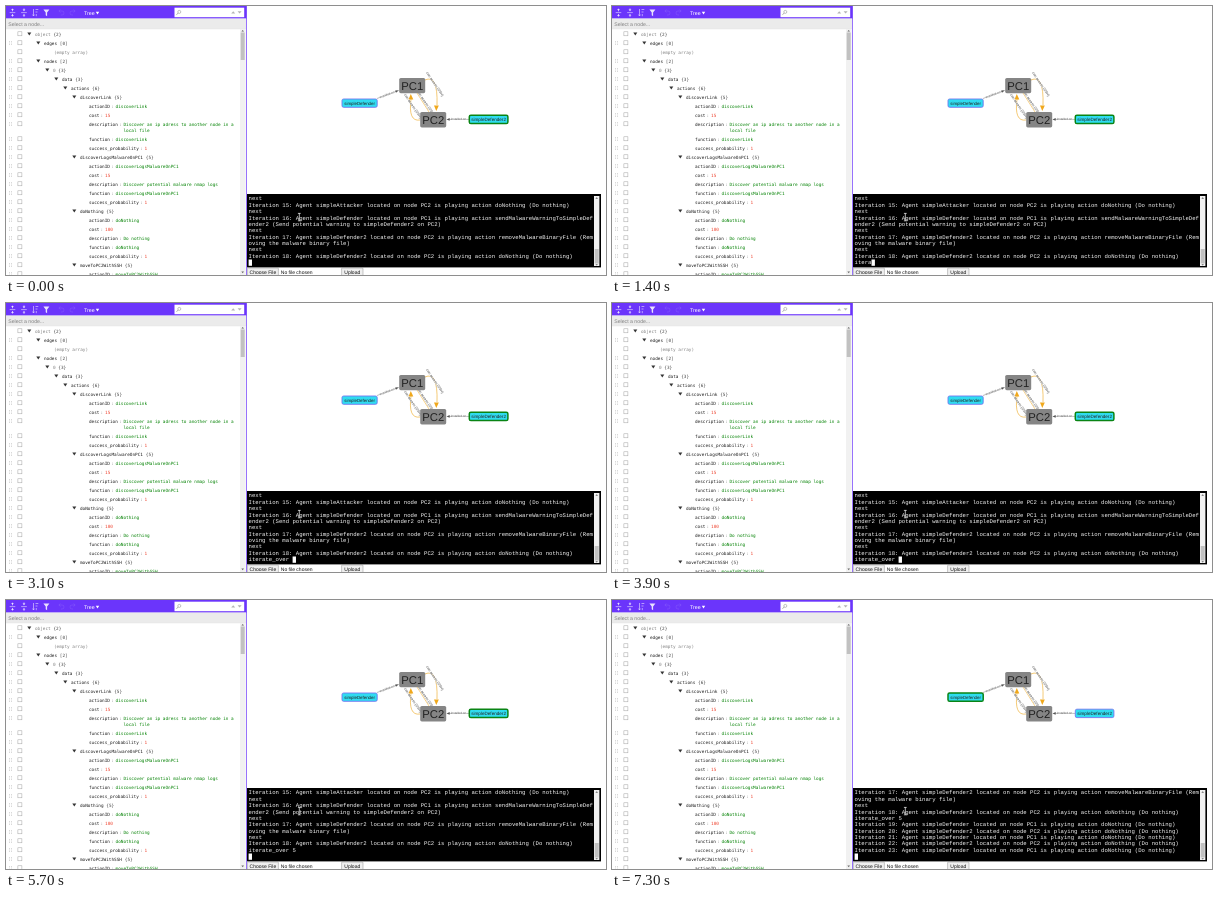
Animation of 600x269 px, one loop 7700 ms. Source, as an HTML page:

```html
<!DOCTYPE html>
<html lang="en">
<head>
<meta charset="utf-8">
<title>Agent graph and terminal</title>
<style>
  html, body { margin: 0; width: 100%; height: 100%; overflow: hidden; background: #fff; }
  svg { display: block; width: 100%; height: 100%; }
  text { white-space: pre; text-rendering: geometricPrecision; font-family: "Liberation Sans", Arial, sans-serif; }
  .tree text { font: 4.375px "DejaVu Sans Mono", monospace; }
  .term text { font: 5.64px "Liberation Mono", monospace; fill: #f4f4f4; }
</style>
</head>
<body>
<svg id="stage" viewBox="0 0 600 269"></svg>
<script>
const LOOP = 7700, LINE = 6.38, CHAR = 3.384, MONO = 2.634;
const stage = document.getElementById('stage');

function add(parent, tag, attrs, content) {
  const node = document.createElementNS('http://www.w3.org/2000/svg', tag);
  for (const key in attrs) node.setAttribute(key, attrs[key]);
  if (content !== undefined) node.textContent = content;
  return parent.appendChild(node);
}
const rect = (parent, x, y, width, height, fill, more) =>
  add(parent, 'rect', { x, y, width, height, fill, ...more });
const text = (parent, x, y, content, fill, more) =>
  add(parent, 'text', { x, y, fill, ...more }, content);
const path = (parent, d, stroke, width = 0.6, more) =>
  add(parent, 'path', { d, stroke, 'stroke-width': width, fill: 'none', ...more });
const shape = (parent, d, fill) => add(parent, 'path', { d, fill });

rect(stage, 0, 0, 600, 269, '#fff');
drawToolbar();
drawTree();
const agents = drawGraph();
const terminal = drawTerminal();
drawUploadForm();

function drawToolbar() {
  const g = add(stage, 'g', {});
  rect(g, 0, 0, 240.5, 12.6, '#6b35fb');
  rect(g, 0, 12.6, 240, 10.2, '#ebebeb');
  path(g, 'M0 22.9H240', '#d3d3d3', 0.4);
  text(g, 2.2, 20, 'Select a node...', '#808080', { 'font-size': 5.2 });
  text(g, 78, 8.6, 'Tree', '#fff', { 'font-size': 5.3 });
  shape(g, 'M89.8 5.8h3.4l-1.7 2.6z', '#fff');
  // expand, collapse, sort, filter
  const icons = add(g, 'g', { opacity: 0.85 });
  path(icons, 'M3.7 6.6H9.3M15.2 6.6H20.8', '#fff', 0.6);
  shape(icons, 'M6.5 2.4l1.4 1.7h-1v1.2h-.8v-1.2h-1zM6.5 10.8l1.4-1.7h-1v-1.2h-.8v1.2h-1z', '#fff');
  shape(icons, 'M18 5.3l1.4-1.7h-1v-1.2h-.8v1.2h-1zM18 7.9l1.4 1.7h-1v1.2h-.8v-1.2h-1z', '#fff');
  path(icons, 'M27.5 3V9.8M26.5 8.6l1 1.4 1-1.4M29.5 3.5h2.8M29.5 6h2M30.3 8v2.2', '#fff', 0.6);
  shape(icons, 'M37.4 3.4h6l-2.3 3.1v3.7l-1.4-.9v-2.8z', '#fff');
  // undo and redo, disabled
  path(g, 'M53 5h3a2 2 0 0 1 0 4h-1M54.4 3.4l-1.6 1.6 1.6 1.6', '#fff', 0.6, { opacity: 0.15 });
  path(g, 'M69 5h-3a2 2 0 0 0 0 4h1M67.6 3.4l1.6 1.6-1.6 1.6', '#fff', 0.6, { opacity: 0.15 });
  rect(g, 168.5, 1.7, 69.7, 9.5, '#fff');
  add(g, 'circle', { cx: 173.3, cy: 5.9, r: 1.5, fill: 'none', stroke: '#999', 'stroke-width': 0.6 });
  path(g, 'M172.2 7l-1.7 1.8', '#999', 0.8);
  shape(g, 'M225.2 7.6h4l-2-2.4z', '#b4b4b4');
  shape(g, 'M231.6 5.2h4l-2 2.4z', '#b4b4b4');
}

function drawTree() {
  const g = add(stage, 'g', { class: 'tree' });
  let y = 28;

  function rowControls(draggable = true) {
    rect(g, 11.9, y - 2.2, 4, 4, '#fff', { stroke: '#a0a0a0', 'stroke-width': 0.5 });
    if (!draggable) return;
    for (let i = 0; i < 6; i++)
      rect(g, 3.2 + (i % 2) * 2, y - 2 + (i >> 1) * 1.6, 0.8, 0.8, '#c4c4c4');
  }
  function branch(level, name, size, fill = '#1a1a1a') {
    const x = 29 + level * 9;
    rowControls(level > 0);
    shape(g, `M${x - 7.7} ${y - 1.4}h4l-2 3z`, '#333');
    text(g, x, y + 1.5, name, fill);
    text(g, x + (name.length + 1) * MONO, y + 1.5, size, '#444');
    y += 9;
  }
  function field(name, value, nextLine) {
    const end = 83 + name.length * MONO;
    const fill = typeof value === 'number' ? '#ee422e' : '#008000';
    rowControls();
    text(g, 83, y + 1.5, name, '#1a1a1a');
    text(g, end + 1, y + 1.5, ':', '#808080');
    text(g, end + 5.5, y + 1.5, value, fill);
    if (nextLine) {
      y += 6;
      text(g, end + 5.5, y + 1.5, nextLine, fill);
    }
    y += 9;
  }
  function action(id, cost, description, nextLine) {
    branch(5, id, '{5}');
    field('actionID', id);
    field('cost', cost);
    field('description', description, nextLine);
    field('function', id);
    field('success_probability', 1);
  }

  branch(0, 'object', '{2}', '#808080');
  branch(1, 'edges', '[0]');
  rowControls(false);
  text(g, 48, y + 1.5, '(empty array)', '#808080');
  y += 9;
  branch(1, 'nodes', '[2]');
  branch(2, '0', '{3}', '#808080');
  branch(3, 'data', '{3}');
  branch(4, 'actions', '{6}');
  action('discoverLink', 15, 'Discover an ip adress to another node in a', 'local file');
  action('discoverLogsMalwareOnPC1', 15, 'Discover potential malware nmap logs');
  action('doNothing', 100, 'Do nothing');
  branch(5, 'moveToPC2WithSSH', '{5}');
  field('actionID', 'moveToPC2WithSSH');

  rect(g, 234, 23.1, 5.6, 246, '#f1f1f1');
  rect(g, 234.7, 26.5, 4, 27.5, '#c1c1c1');
  shape(g, 'M235.4 25.6h2.6l-1.3-1.6z', '#666');
  shape(g, 'M235.4 265.6h2.6l-1.3 1.6z', '#666');
  rect(g, 240, 0, 0.7, 269, '#6b35fb');
}

function drawGraph() {
  const g = add(stage, 'g', {});
  const label = (x, y, angle, content, size) => text(g, 0, 0, content, '#444', {
    transform: `translate(${x} ${y}) rotate(${angle})`, 'font-size': size,
    'text-anchor': 'middle', dy: size * 0.35,
    stroke: '#fff', 'stroke-width': 0.4, 'paint-order': 'stroke'
  });
  path(g, 'M371 92.5L391 85', '#777', 0.5);
  shape(g, 'M393 84.3l-3 2.5-.9-2.4z', '#555');
  path(g, 'M463 113.4H443', '#777', 0.5);
  shape(g, 'M440.5 113.4l3.2-1.4v2.8z', '#555');
  path(g, 'M419 74Q432 68 431 99', '#f2bd55', 0.8);
  path(g, 'M414 114Q402 116 405 93', '#f2bd55', 0.8);
  path(g, 'M411 87L423 106', '#f2bd55', 0.7);
  shape(g, 'M430.3 105l-2.3-5.5h4.8z', '#f0a81c');
  shape(g, 'M404.8 88l-2.3 5.5h4.8z', '#f0a81c');
  label(381, 88.6, -20, 'installed on', 3);
  label(452.5, 113.4, 0, 'installed on', 3);
  label(429, 78, 56, 'can access (SSH)', 3.6);
  label(407, 100, 56, 'can access (SSH)', 3.6);
  label(420, 97, 56, 'can access (SSH)', 3.6);

  function node(x, y, width, height, name, size, fill, more) {
    const box = rect(g, x, y, width, height, fill, { rx: 1.6, ...more });
    text(g, x + width / 2, y + height / 2 + size * 0.35, name, '#222',
      { 'font-size': size, 'text-anchor': 'middle' });
    return box;
  }
  node(393.2, 72, 26, 15.2, 'PC1', 11.3, '#858585');
  node(414.2, 106, 26, 15.4, 'PC2', 11.3, '#858585');
  return [
    node(336, 93, 35.2, 8.3, 'simpleDefender', 4.4, '#2fdcf0'),
    node(463.3, 109.2, 38.6, 8.4, 'simpleDefender2', 4.6, '#2fdcf0')
  ];
}

function drawTerminal() {
  const g = add(stage, 'g', { class: 'term' });
  rect(g, 241, 188, 354, 73.4, '#000');
  rect(g, 588, 190, 5.4, 70, '#f1f1f1');
  rect(g, 588.7, 243, 4, 14.5, '#c1c1c1');
  shape(g, 'M589.4 192.8h2.6l-1.3-1.6z', '#666');
  shape(g, 'M589.4 258.2h2.6l-1.3 1.4z', '#666');
  const rows = Array.from({ length: 11 }, (_, i) => text(g, 242.6, 194.4 + i * LINE, '', '#f4f4f4'));
  const caret = rect(g, 242.6, 253.5, CHAR, 6.3, '#fff');
  path(g, 'M291.9 207.4h2.8M293.3 207.4v7.4M291.9 214.8h2.8', '#fff', 0.7);
  return { rows, caret };
}

function drawUploadForm() {
  const g = add(stage, 'g', { 'font-size': 5 });
  const button = (x, width, label) => {
    rect(g, x, 262, width, 8, '#efefef', { rx: 0.8, stroke: '#767676', 'stroke-width': 0.4 });
    text(g, x + width / 2, 267.6, label, '#111', { 'text-anchor': 'middle' });
  };
  button(241.4, 31, 'Choose File');
  text(g, 274.8, 267.6, 'No file chosen', '#111');
  button(335.6, 21.4, 'Upload');
}

const idle = (number, agent, pc) =>
  `Iteration ${number}: Agent ${agent} located on node ${pc} is playing action doNothing (Do nothing)`;
const history = [
  'next',
  idle(15, 'simpleAttacker', 'PC2'),
  'next',
  'Iteration 16: Agent simpleDefender located on node PC1 is playing action sendMalwareWarningToSimpleDef',
  'ender2 (Send potential warning to simpleDefender2 on PC2)',
  'next',
  'Iteration 17: Agent simpleDefender2 located on node PC2 is playing action removeMalwareBinaryFile (Rem',
  'oving the malware binary file)',
  'next',
  idle(18, 'simpleDefender2', 'PC2')
];
const command = 'iterate_over 5';
const results = Array.from({ length: 5 }, (_, i) => i % 2
  ? idle(19 + i, 'simpleDefender2', 'PC2')
  : idle(19 + i, 'simpleDefender', 'PC1'));

const clamp = (value, low, high) => Math.max(low, Math.min(high, value));

function render(t) {
  const entered = t >= 5700;
  const done = clamp(Math.floor((t - 5900) / 150) + 1, 0, 5);
  const typed = t >= 4900 ? 14 : clamp(Math.floor((t - 300) / 200), 0, 13);
  const prompt = entered ? '' : command.slice(0, typed);

  const lines = [...history];
  if (entered) lines.push(command, ...results.slice(0, done));
  lines.push(prompt);
  lines.slice(-11).forEach((line, i) => {
    if (terminal.rows[i].textContent !== line) terminal.rows[i].textContent = line;
  });
  terminal.caret.setAttribute('x', 242.6 + prompt.length * CHAR);

  const active = done % 2 ? 0 : 1;
  agents.forEach((box, i) => {
    box.setAttribute('stroke', i === active ? '#0a8414' : '#7476f0');
    box.setAttribute('stroke-width', i === active ? 1.5 : 0.9);
  });
}

const start = performance.now();
function tick() {
  render((performance.now() - start) % LOOP);
  requestAnimationFrame(tick);
}
tick();
</script>
</body>
</html>
```
